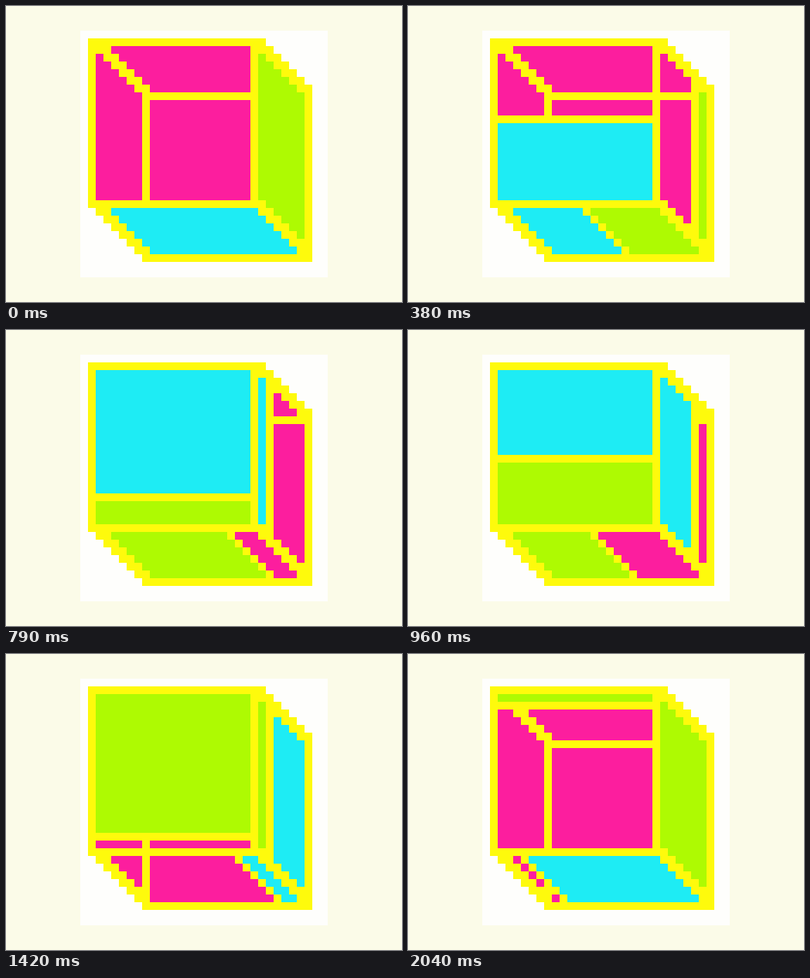
These frames come from a looping animation (512x384 px, 2.08 s). An HTML page with a canvas:

```html
<!DOCTYPE html>
<html lang="en">
<head>
<meta charset="utf-8">
<title>Sliding cube</title>
<style>
html, body { margin: 0; width: 100%; height: 100%; overflow: hidden; }
canvas { display: block; }
</style>
</head>
<body>
<canvas id="stage" width="512" height="384"></canvas>
<script>
const ctx = document.getElementById('stage').getContext('2d');
const LOOP = 2080, CELL = 10, SIZE = 29, FACE = 21, DEPTH = 7;
const BACKDROP = '#fbfbe8', PAPER = '#fefefc', LINE = '#fefa0c';
const PINK = '#fc1e9e', CYAN = '#1eecf4', GREEN = '#aefa02';

// Colours of front, floor and right side at rest; pink is the open inside.
const states = [
  [PINK, CYAN, GREEN],
  [CYAN, GREEN, PINK],
  [GREEN, PINK, CYAN]
];

// Per phase: time, then cells travelled by the front, floor and right bars.
const phases = [
  [[0, 0, 0, 0], [380, 11, 10, 5], [580, 17, 17, 7]],
  [[670, 0, 0, 0], [960, 9, 9, 5], [1080, 13, 12, 7], [1290, 19, 18, 7]],
  [[1330, 0, 0, 0], [1420, 2, 3, 2], [1750, 12, 10, 7], [2040, 19, 18, 7]]
];

// Film ticks at 24 per second; each of these lasts two ticks.
const held = [1, 7, 14, 21, 27, 34, 38, 42];
const tickTime = n => Math.round(n * 100 / 24) * 10;

function steppedTime(t) {
  let n = 0;
  while (n < 49 && tickTime(n + 1) <= t + 0.01) n++;
  return tickTime(held.includes(n - 1) ? n - 1 : n);
}

function travel(keys, t) {
  let i = 0;
  while (i < keys.length - 2 && t >= keys[i + 1][0]) i++;
  const a = keys[i], b = keys[i + 1];
  const p = Math.min(1, (t - a[0]) / (b[0] - a[0]));
  return [1, 2, 3].map(k => Math.round(a[k] + (b[k] - a[k]) * p));
}

function onDiagonal(c, r, x, y) {
  const k = r - y, d = c - x - k;
  return k >= 0 && k < DEPTH && (d === 0 || d === 1);
}

function onFrame(c, r) {
  const front = c <= FACE && r <= FACE &&
    (c === 0 || r === 0 || c === FACE || r === FACE);
  const back = (c === SIZE - 1 && r >= DEPTH) || (r === SIZE - 1 && c >= DEPTH);
  return front || back || onDiagonal(c, r, FACE, 0) ||
    onDiagonal(c, r, 0, FACE) || onDiagonal(c, r, FACE, FACE);
}

function onInnerEdge(c, r) {
  return (r === DEPTH && c >= DEPTH) || (c === DEPTH && r >= DEPTH) ||
    onDiagonal(c, r, 0, 0);
}

function cellColor(c, r, from, to, move) {
  if (onFrame(c, r)) return LINE;
  if (c < r - FACE || r < c - FACE) return null;
  let side, ahead;   // ahead > 0: the bar has already passed
  if (c <= FACE && r <= FACE) {
    side = 0;
    ahead = r - (FACE - move[0]);
  } else if (r > FACE && c < r) {
    side = 1;
    ahead = c - (r - FACE) - (FACE - move[1]);
  } else {
    side = 2;
    ahead = FACE + move[2] - c;
  }
  if (ahead === 0) return LINE;
  const color = (ahead > 0 ? to : from)[side];
  return color === PINK && onInnerEdge(c, r) ? LINE : color;
}

function draw(now) {
  const t = steppedTime(now % LOOP);
  let p = 2;
  while (t < phases[p][0][0]) p--;
  const move = travel(phases[p], t);

  ctx.fillStyle = BACKDROP;
  ctx.fillRect(0, 0, 512, 384);
  ctx.fillStyle = PAPER;
  ctx.fillRect(96, 32, 320, 320);
  for (let r = 0; r < SIZE; r++) {
    for (let c = 0; c < SIZE; c++) {
      const color = cellColor(c, r, states[p], states[(p + 1) % 3], move);
      if (!color) continue;
      ctx.fillStyle = color;
      ctx.fillRect(106 + c * CELL, 42 + r * CELL, CELL, CELL);
    }
  }
}

const start = performance.now();
function loop() {
  draw(performance.now() - start);
  requestAnimationFrame(loop);
}
loop();
</script>
</body>
</html>
```
